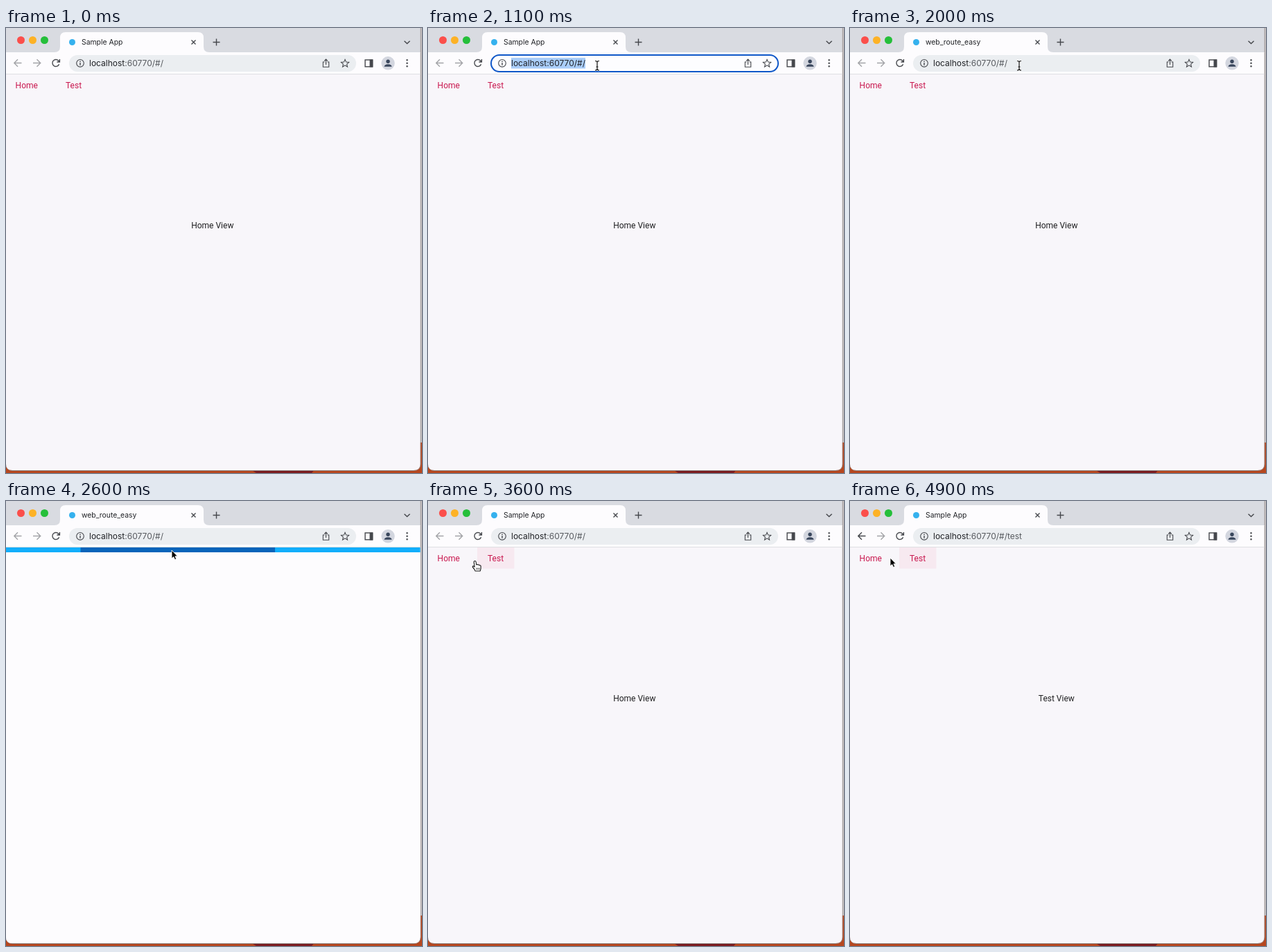
Animation, 600 px wide and 642 px high, one loop 5 s. Source, as an HTML page:

```html
<!DOCTYPE html>
<html lang="en">
<head>
<meta charset="utf-8">
<style>
  html, body { margin: 0; width: 100%; height: 100%; overflow: hidden; }
  svg { display: block; }
  text { white-space: pre; }
  .ui { font-family: Inter, sans-serif; fill: #202226; }
  .page { font: 12px Roboto, sans-serif; }
  .link { fill: #c9184f; }
  .icon { fill: none; stroke: #45474c; stroke-width: 1.4; }
</style>
</head>
<body>
<svg width="600" height="642" viewBox="0 0 600 642">
  <defs>
    <clipPath id="window"><path d="M0 0H597.5V629Q597.5 638 588 638H9Q0 638 0 629Z"/></clipPath>
  </defs>

  <!-- desktop -->
  <rect width="600" height="642" fill="#c9c6c8"/>
  <path d="M588 598H600V642H0V628H588Z" fill="#b6471f"/>
  <path d="M353 637H445L441 642H361Z" fill="#7b1c20"/>
  <path d="M0 630Q1 638.5 9 638.5H588Q598 638.5 598 629V0" fill="none" stroke="#8e8482"/>

  <g clip-path="url(#window)">
    <rect width="600" height="36" fill="#d9dbe1"/>
    <rect y="35" width="600" height="32" fill="#fdfcfe"/>
    <path d="M70 35Q78 35 78 27V14Q78 6 86 6H277Q285 6 285 14V27Q285 35 293 35Z" fill="#fdfcfe"/>
    <circle cx="21.5" cy="17.5" r="5.5" fill="#fb4f4b"/>
    <circle cx="38.5" cy="17.5" r="5.5" fill="#fdb226"/>
    <circle cx="55.5" cy="17.5" r="5.5" fill="#25bf3a"/>
    <circle cx="95.5" cy="20.5" r="4.5" fill="#35b1ee"/>
    <text id="title" class="ui" x="109" y="24.2" font-size="10.4"></text>
    <g class="icon" stroke-width="1.5">
      <path d="M267.5 17.5L273.5 23.5M273.5 17.5L267.5 23.5M298.5 20.5H308.5M303.5 15.5V25.5"/>
      <path d="M574.5 18.8L578.5 22.6L582.5 18.8"/>
    </g>

    <!-- toolbar -->
    <rect id="field" x="91" y="39" width="414" height="24" rx="12"/>
    <rect id="selection" x="120" y="43" width="107" height="15.5" fill="#a9cdf9"/>
    <text class="ui" x="120" y="55" font-size="12">localhost<tspan id="path" fill="#56595e"></tspan></text>
    <g class="icon">
      <path id="back" d="M22.5 50.5H12M17 45.3L11.8 50.5L17 55.7"/>
      <path d="M39 50.5H49.5M44.5 45.3L49.7 50.5L44.5 55.7" stroke="#a3a4a8"/>
      <path id="reload" d="M76.6 52.3A5 5 0 1 1 75.5 46.9L77 48.5M77.4 45V49H73.4"/>
      <path id="stop" d="M68 46.5L76 54.5M76 46.5L68 54.5"/>
      <circle cx="107" cy="50.8" r="5.3" stroke-width="1.1"/>
      <path d="M107 50V53.8M107 47.6V49"/>
      <path d="M459.5 49H457.3V56.3H465.7V49H463.5M461.5 53V45.4M459 47.6L461.5 45.1L464 47.6" stroke-width="1.1"/>
      <path d="M489 45.4L490.6 49.1L494.6 49.5L491.6 52.1L492.5 56L489 53.9L485.5 56L486.4 52.1L483.4 49.5L487.4 49.1Z" stroke-width="1.1"/>
      <rect x="518" y="46" width="10.6" height="9.8"/>
    </g>
    <path d="M524.5 45.5H529.2V56.5H524.5Z" fill="#45474c"/>
    <circle cx="551" cy="50.8" r="9.7" fill="#d3d6df"/>
    <circle cx="551" cy="48.3" r="2.7" fill="#39465c"/>
    <path d="M545.5 55.8Q546 52.3 551 52.3T556.5 55.8Z" fill="#39465c"/>
    <path d="M578.5 46.3V55.6" stroke="#45474c" stroke-width="2.5" stroke-linecap="round" stroke-dasharray="0 4.5"/>
    <rect y="66" width="600" height="1" fill="#dedfe3"/>

    <!-- page -->
    <g id="app" class="page">
      <rect y="67" width="600" height="575" fill="#f8f6fa"/>
      <path id="hover" d="M71 67H124.5V97.5H71Z" fill="#f7e9f0"/>
      <circle id="splash" cx="97" cy="83" fill="#e91e63" clip-path="url(#button)"/>
      <clipPath id="button"><path d="M71 67H124.5V97.5H71Z"/></clipPath>
      <text class="link" x="13.6" y="87">Home</text>
      <text class="link" x="86" y="87">Test</text>
      <text id="view" x="297.8" y="289.2" text-anchor="middle" fill="#202022"></text>
    </g>
    <g id="loader">
      <rect y="67" width="600" height="575" fill="#fdfcfe"/>
      <rect y="67" width="600" height="7" fill="#12aefb"/>
      <rect id="bar" y="67" height="7" fill="#0864ba"/>
    </g>
  </g>

  <!-- pointers, each with its hot spot at 0,0 -->
  <g id="pointer">
    <path id="arrow" d="M0 0V12L2.7 9.6L4.6 13.6L6.7 12.6L4.9 8.8H8.4Z" fill="#000" stroke="#fff" stroke-width=".9"/>
    <g id="beam" fill="none">
      <path id="beamLine" d="M-3 -6.5Q0 -6.5 0 -4.5V5Q0 7 -3 7M3 -6.5Q0 -6.5 0 -4.5V5Q0 7 3 7M-1.5 2H1.5" stroke="#fff" stroke-width="2.4"/>
      <use href="#beamLine" style="stroke:#000"/>
      <path d="M-3 -6.5Q0 -6.5 0 -4.5V5Q0 7 -3 7M3 -6.5Q0 -6.5 0 -4.5V5Q0 7 3 7M-1.5 2H1.5" stroke="#111" stroke-width="1.2"/>
    </g>
    <g id="hand">
      <path d="M-1.8 0Q-1.7 -1.6 -.3 -1.5T1.2 0L1.8 4Q3.5 2.9 4.4 4.3Q5.8 3.5 6.6 4.9Q8.2 4.6 8.2 6.5Q8.5 10 7.2 13H0Q-.5 10.6 -3.5 7.5Q-4.2 5.7 -2.6 5.7L-.8 7.1Z" fill="#fff" stroke="#151515" stroke-width="1.1" stroke-linejoin="round"/>
      <path d="M2 8.5V11M4 8.5V11M6 8.5V11" stroke="#151515" stroke-width=".8"/>
    </g>
  </g>
</svg>
<script>
const LOOP = 5000, STEP = 100, WIDTH = 598;
const $ = id => document.getElementById(id);
const show = (id, on) => { $(id).style.display = on ? '' : 'none'; };
const set = (id, attrs) => {
  for (const name in attrs) $(id).setAttribute(name, attrs[name]);
};
const smooth = p => p * p * (3 - 2 * p);

// time, x, y
const moves = [
  [100, 330, 400], [600, 245, 55], [700, 244, 54], [2200, 244, 54],
  [2600, 239, 71], [2700, 236, 74], [2900, 236, 74], [3500, 82, 88],
  [3600, 68, 88], [3800, 94, 86], [4500, 94, 86], [4900, 58, 82]
];

function pointerAt(t) {
  const next = moves.findIndex(m => m[0] >= t);
  if (next < 1) return moves[0].slice(1);
  const [t0, x0, y0] = moves[next - 1], [t1, x1, y1] = moves[next];
  const p = smooth((t - t0) / (t1 - t0));
  return [x0 + (x1 - x0) * p, y0 + (y1 - y0) * p];
}

// CSS ease-out, cubic-bezier(0, 0, .58, 1)
function easeOut(x) {
  let lo = 0, hi = 1;
  for (let i = 0; i < 20; i++) {
    const s = (lo + hi) / 2;
    if (1.74 * (1 - s) * s * s + s ** 3 < x) lo = s; else hi = s;
  }
  return smooth(lo);
}

function draw(t) {
  const between = (a, b) => t >= a && t < b;
  const [x, y] = pointerAt(t);
  const overField = t >= 100 && y > 39 && y < 63;
  const overButton = t >= 3000 && x > 66 && x < 126;
  const focused = between(900, 1600);
  const opened = t >= 4100;

  $('title').textContent = between(1800, 3000) ? 'web_route_easy' : 'Sample App';
  $('path').textContent = ':60770/#/' + (opened ? 'test' : '');
  $('path').style.fill = focused ? '#202226' : '';
  $('view').textContent = opened ? 'Test View' : 'Home View';
  set('back', { stroke: opened ? '#45474c' : '#a3a4a8' });
  set('field', {
    fill: focused ? '#fdfdff' : overField && t < 900 ? '#e1e2e5' : '#ebeef1',
    stroke: focused ? '#0f57c8' : 'none',
    'stroke-width': 2
  });
  show('selection', focused);
  show('reload', !between(1600, 2000));
  show('stop', between(1600, 2000));

  show('loader', between(2200, 3000));
  const p = easeOut((Math.min(t, 2700) - 1976) / 1500);
  set('bar', { x: WIDTH * (2 * p - 1), width: WIDTH * (1 - .9 * p) });

  show('hover', t >= 3400);
  const press = (t - 3900) / 600;
  show('splash', press > 0 && press < 1);
  set('splash', { r: Math.max(0, press) * 50, opacity: .1 * (1 - press) });

  show('pointer', t >= 100);
  set('pointer', { transform: `translate(${x} ${y})` });
  show('beam', overField);
  show('hand', overButton);
  show('arrow', !overField && !overButton);
}

function frame(now) {
  draw(Math.floor(now % LOOP / STEP) * STEP);
  requestAnimationFrame(frame);
}
requestAnimationFrame(frame);
</script>
</body>
</html>
```
